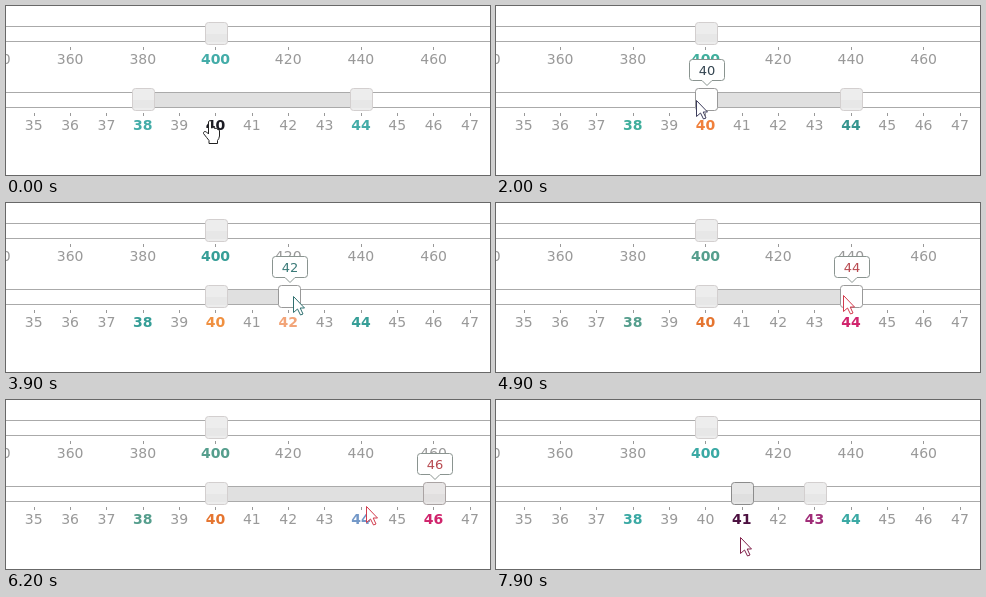
These frames come from a looping animation (484x169 px, 8000 ms). An HTML page with a canvas:

```html
<!DOCTYPE html>
<html>
<head>
<meta charset="utf-8">
<style>
html, body { margin: 0; width: 484px; height: 169px; overflow: hidden; background: #fff; }
canvas { display: block; }
</style>
</head>
<body>
<canvas id="stage" width="484" height="169"></canvas>
<script>
const ctx = document.getElementById('stage').getContext('2d');
const LOOP = 8000, STEP = 100, UNIT = 36.35;
const xOf = v => 209.5 + UNIT * (v - 40);
const handleX = v => Math.floor(xOf(v) + 1) + .5;

// Pointer path: time, x, y
const path = [
  [0, 204, 114], [500, 139, 92], [1100, 139, 92], [1300, 155, 96], [1500, 178, 95],
  [1800, 178, 95], [2100, 211, 94], [2300, 211, 94], [2800, 354, 92], [2900, 354, 92],
  [3900, 287, 93], [4500, 287, 93], [5400, 421, 90], [5600, 423, 89], [5800, 423, 89],
  [6500, 312, 119], [6800, 312, 119], [7000, 290, 152], [7100, 290, 152],
  [7400, 245, 118], [7700, 245, 118], [7900, 244, 137]
];

// Colour moods
const moods = [
  { from: 0, teal: '#43aca8', ink: '#222', tip: '#333', low: '#43aca8', high: '#43aca8' },
  { from: 500, teal: '#3fae9c', ink: '#3d3d5c', tip: '#334450', low: '#f0803c', high: '#35958f' },
  { from: 2400, teal: '#3b9f8e', ink: '#2f6070', tip: '#4c7f74', low: '#f07f45', high: '#ef7c78' },
  { from: 3000, teal: '#369e97', ink: '#2f7070', tip: '#3a7a78', low: '#f09040', high: '#f2a478' },
  { from: 4600, teal: '#559e8d', ink: '#d23b4d', tip: '#b84a50', low: '#e57530', high: '#d0246c', mid: '#7398c8' },
  { from: 6500, teal: '#45b3b3', ink: '#1c1c2c', tip: '#222233', low: '#c88020', high: '#22222e' },
  { from: 6900, teal: '#3aa9a4', ink: '#80204a', tip: '#333', low: '#c88020', high: '#a02c78' },
  { from: 7500, teal: '#3aa9a4', ink: '#80204a', tip: '#333', low: '#4c1040', high: '#a02c78' }
];

const styles = {
  idle: ['#ededed', '#e7e7e7', '#d3cfcf'],
  hover: ['#e6e6e6', '#dfdfdf', '#8c8c8c'],
  fading: ['#e8e6e6', '#e1dfdf', '#aaa3a3'],
  active: ['#fff', '#fff', '#999']
};

const arrow = new Path2D('M.5.5V16.5L4.5 13 7.5 19 10 18 7.2 12H11.5Z');
const hand = new Path2D('M-1.5 14V1.5Q0-.5 1.5 1.5V8Q3.5 6.5 4.5 8.5Q6.5 7.5 7.5 9.5' +
  'Q9.5 9 9.5 11V16Q9 19 7.5 20.5V23.5H-1V20.5Q-3 18-6.5 13.5Q-6.5 10.5-3.5 12Z');

function pointerAt(t) {
  const i = path.findIndex(p => p[0] > t);
  if (i < 0) return path[path.length - 1].slice(1);
  const [a, b] = [path[i - 1], path[i]], k = (t - a[0]) / (b[0] - a[0]);
  return [1, 2].map(n => a[n] + (b[n] - a[n]) * k);
}

function text(s, x, y, color, font) {
  ctx.font = font + ' "DejaVu Sans", Verdana, sans-serif';
  ctx.textAlign = 'center';
  ctx.fillStyle = color;
  ctx.fillText(s, x, y);
}

function label(s, x, y, color) {
  ctx.fillStyle = '#999';
  ctx.fillRect(Math.floor(x + .3), y - 17, 1, 3);
  text(s, x, y, color || '#999', (color ? 'bold ' : '') + '14px');
}

function track(y) {
  ctx.fillStyle = '#aaa';
  ctx.fillRect(0, y, 484, 1);
  ctx.fillRect(0, y + 15, 484, 1);
}

function handle(x, y, style) {
  const [top, bottom, border] = styles[style];
  ctx.beginPath();
  ctx.roundRect(x - 11, y, 22, 22, 3);
  ctx.fillStyle = top;
  ctx.fill();
  ctx.fillStyle = bottom;
  ctx.fillRect(x - 10.5, y + 11.5, 21, 8);
  ctx.strokeStyle = border;
  ctx.stroke();
}

function tooltip(v, color) {
  const x = handleX(v) + .5, l = x - 17.5, r = x + 17.5;
  ctx.beginPath();
  ctx.moveTo(l + 3, 53.5);
  ctx.arcTo(r, 53.5, r, 60, 3);
  ctx.arcTo(r, 74.5, x, 74.5, 3);
  ctx.lineTo(x + 5, 74.5);
  ctx.lineTo(x, 79.5);
  ctx.lineTo(x - 5, 74.5);
  ctx.arcTo(l, 74.5, l, 60, 3);
  ctx.arcTo(l, 53.5, x, 53.5, 3);
  ctx.closePath();
  ctx.fillStyle = '#fff';
  ctx.fill();
  ctx.strokeStyle = '#8a9490';
  ctx.stroke();
  text(Math.round(v), x, 69, color, '13px');
}

function draw(t) {
  const mood = moods.filter(m => m.from <= t).pop();
  const [px, py] = pointerAt(t);
  const snapped = Math.round(40 + (px - 3 - 209.5) / UNIT);
  const low = t < 1100 ? 38 : t < 2400 ? snapped : t < 7500 ? 40 : t < 7600 ? 40.5 : 41;
  const high = t < 3000 ? 44 : t < 5900 ? snapped : 46 - 3 * Math.min(1, Math.max(0, (t - 6500) / 300));

  ctx.fillStyle = '#fff';
  ctx.fillRect(0, 0, 484, 169);

  track(20);
  for (let v = 340; v <= 460; v += 20)
    label(v, xOf(40 + (v - 400) / 10), 58, v === 400 && mood.teal);
  handle(210.5, 16.5, 'idle');

  track(86);
  ctx.fillStyle = '#e0e0e0';
  ctx.fillRect(handleX(low), 87, handleX(high) - handleX(low), 14);

  let pointing = false;
  for (let v = 35; v <= 47; v++) {
    const x = xOf(v);
    const over = py > 107 && py < 128 && Math.abs(px - x) < 12;
    pointing = pointing || over;
    let color = null;
    if (over) color = '#1c1c24';
    else if (v === high) color = mood.high;
    else if (v === 44 && mood.mid) color = mood.mid;
    else if (v === 38 || v === 44) color = mood.teal;
    else if (v === Math.floor(low)) color = mood.low;
    label(v, x, 124, color);
  }

  handle(handleX(low), 82.5,
    t >= 1100 && t < 2400 ? 'active' : t >= 700 && t < 3000 || t >= 7500 ? 'hover' : 'idle');
  handle(handleX(high), 82.5,
    t >= 3000 && t < 6000 ? 'active' : t >= 2700 && t < 3000 ? 'hover' : t >= 6000 && t < 7000 ? 'fading' : 'idle');

  if (t >= 700 && t < 3000 || t >= 7500 && t < 7900) tooltip(low, mood.tip);
  if (t >= 3000 && t < 7000) tooltip(high, mood.tip);

  ctx.save();
  ctx.translate(Math.round(px), Math.round(py));
  const shape = pointing ? hand : arrow;
  ctx.fillStyle = '#fff';
  ctx.fill(shape);
  ctx.strokeStyle = pointing ? '#222' : mood.ink;
  ctx.stroke(shape);
  ctx.restore();
}

function frame() {
  draw(Math.floor(performance.now() % LOOP / STEP) * STEP);
  requestAnimationFrame(frame);
}
frame();
</script>
</body>
</html>
```
